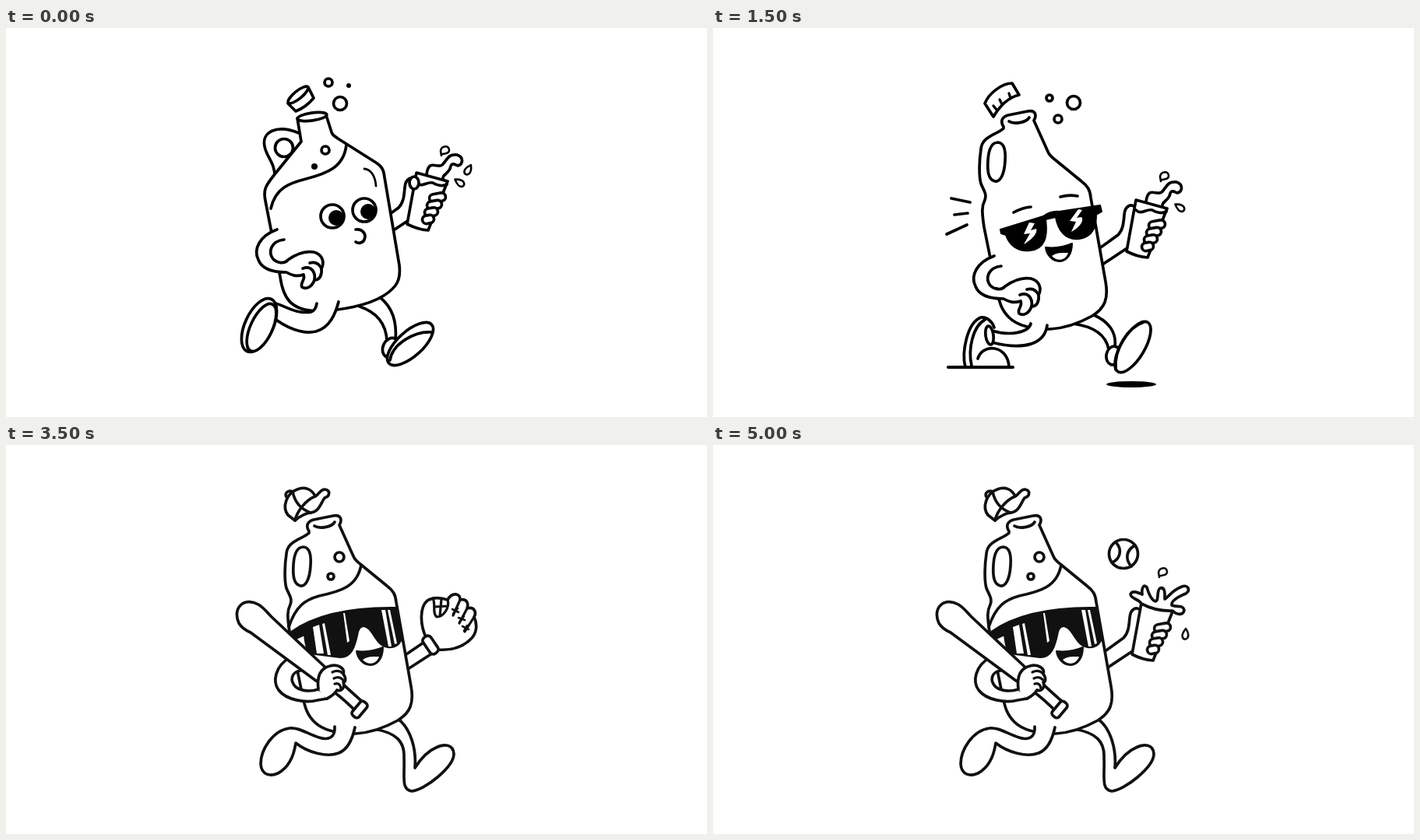
An HTML page that plays this animation: 900x500 px, repeating every 5500 ms.

```html
<!DOCTYPE html>
<html lang="en">
<head>
<meta charset="utf-8">
<title>Running bottle</title>
<style>
html, body { margin: 0; width: 100%; height: 100%; overflow: hidden; background: #fff; }
svg { display: block; width: 900px; height: 500px; }
#stage { fill: none; stroke: currentColor; stroke-width: 3.7; stroke-linecap: round; stroke-linejoin: round; }
</style>
</head>
<body>
<svg viewBox="0 0 900 500"><g id="stage"></g></svg>
<script>
const line = (d, w = 3.7) => `<path d="${d}" stroke-width="${w}"/>`;
const shape = d => `<path d="${d}" fill="#fff"/>`;
const ink = d => `<path d="${d}" fill="currentColor" stroke-width="2"/>`;
const glint = d => `<path d="${d}" fill="#fff" stroke="none"/>`;
const oval = (x, y, rx, ry = rx, turn = 0) =>
  `<ellipse cx="${x}" cy="${y}" rx="${rx}" ry="${ry}" fill="#fff" transform="rotate(${turn} ${x} ${y})"/>`;
const pill = (x, y, w, h, turn, r = h / 2) =>
  `<rect x="${x - w / 2}" y="${y - h / 2}" width="${w}" height="${h}" rx="${r}" fill="#fff" transform="rotate(${turn} ${x} ${y})"/>`;
const dot = (x, y, rx, ry = rx) => `<ellipse cx="${x}" cy="${y}" rx="${rx}" ry="${ry}" fill="currentColor" stroke="none"/>`;
const move = (x, y, ...parts) => `<g transform="translate(${x} ${y})">${parts.join('')}</g>`;
const spin = (a, x, y, part) => `<g transform="rotate(${a} ${x} ${y})">${part}</g>`;
const curl = (x, y) => move(x, y, line('M-4 6L-5 0C-4-7 6-8 6-1C6 4 1 3-2 4', 2.6));
const tear = (x, y, a = 0) => move(x, y, spin(a, 0, 0, line('M1-7C-3-2-5 3-2 6C2 8 5 4 4 0C4-3 2-5 1-7Z', 2.6)));
const bubbles = (...list) => list.map(([x, y, r]) => oval(x, y, r)).join('');

// Bottle
const rim = line('M374 102C380 106 396 104 400 97');
const grip = shape('M347 152C348 136 352 129 360 129C368 130 370 140 369 153C368 170 363 180 356 179C348 177 346 168 347 152Z');
const bottle = shape('M367 109C362 101 366 96 373 94L398 89C408 87 410 94 406 101L424 141C426 146 430 149 434 152L467 179C475 185 478 190 479 200L498 308C502 330 497 342 481 352C463 362 443 368 427 369C405 369 386 366 374 354C364 344 362 335 359 322L342 238C339 218 339 211 343 203C346 195 341 190 338 182C335 172 336 150 338 138C339 121 359 119 367 111') + rim + grip;
const liquid = line('M341 232C350 205 362 197 380 192C408 186 429 180 434 152') + oval(406, 142, 6) + oval(395, 167, 4);

// Faces
const goggles = ink('M344 238C372 218 414 206 478 207L487 244C484 256 476 259 468 258C459 257 455 250 449 241C442 230 434 227 430 238C426 259 421 271 407 271L375 267C365 266 363 260 361 242L346 249Z')
  + glint('M372 232L380 229L386 266L377 266ZM384 228L387 227L395 268L391 268ZM411 214L413 214L419 250L416 252ZM460 210L465 210L473 257L469 257ZM468 210L471 210L480 253L477 254Z');
const smile = ink('M428 263Q446 265 462 258C462 272 455 281 446 281C436 281 429 272 428 263Z')
  + glint('M436 274C442 269 451 270 457 270C453 281 442 281 436 274Z');
const shades = ink('M367 266L422 249Q432 242 442 243L495 235L497 243L490 247C490 264 484 276 468 278C450 280 441 267 438 250L425 253C428 275 424 291 405 293C388 295 378 285 374 273L368 271Z')
  + glint('M404 257L397 272L405 271L397 285C409 278 415 270 413 265L406 267L411 258ZM467 240L456 255L464 256L458 269C469 263 475 254 471 250L465 251L472 241Z')
  + line('M384 244Q395 238 406 237M444 224Q455 221 466 223');
const eye = (x, y) => oval(x, y, 15) + dot(x + 5, y + 2, 10);

// Limbs
const runLeft = shape('M400 360C401 374 392 378 380 374C364 369 355 361 342 362C320 365 305 390 305 408C306 423 318 424 327 420C342 412 348 395 350 381C365 393 390 400 405 394C418 389 423 375 426 361');
const runRight = shape('M451 363C480 368 490 380 489 400C490 425 485 441 499 443C515 442 553 412 553 395C552 382 540 382 530 387C518 392 510 402 503 413C505 390 498 362 481 350');
const fistArm = '<circle cx="358" cy="302" r="13" fill="#fff" stroke="none"/>'
  + shape('M355 275C333 283 324 300 331 314C336 327 353 330 367 330C374 334 380 336 389 333C392 339 384 344 387 349C393 353 400 348 403 340C410 340 413 333 412 325C416 318 414 307 402 304C390 302 380 306 369 314C364 320 355 318 350 313C343 304 347 290 364 288')
  + line('M397 318C404 316 409 319 412 325M388 325C398 321 405 329 403 340');

// Cup
const reach = shape('M489 264L514 246C520 240 521 232 522 220C523 208 531 205 537 211L530 262L524 264L494 284');
const glass = shape('M537 201L577 212L552 275Q538 274 525 267Z');
const fingers = [0, 1, 2, 3].map(i => pill(564 - 4 * i, 233 + 9.3 * i, 21 - 2 * i, 10.5, -10)).join('');
const wave = shape('M550 203C553 181 565 198 571 190C577 183 578 177 589 178C598 181 597 190 590 192C585 190 582 187 580 196C576 204 570 203 571 210');
const cup = reach + wave + glass + line('M537 214C544 221 550 212 558 214C565 218 570 219 576 216') + fingers;
const splash = tip => reach + glass
  + shape(`M537 202C534 196 524 196 523 190C525 184 533 188 538 190C537 182 540 176 544 181C546 188 549 197 555 199C560 198 556 185 561 182C568 180 567 190 567 196C573 193 574 186 ${tip - 9} 180C${tip - 2} 177 ${tip + 3} 184 ${tip - 4} 189C582 194 575 199 576 204C583 207 590 203 592 210C591 217 583 217 577 211Q556 212 537 202`)
  + fingers;
const ball = oval(529, 138, 18.5) + line('M519 123C528 132 525 145 514 149M544 127C532 133 531 145 539 154');
const sipCup = cup + curl(573, 172);
const tossCup = tip => splash(tip) + curl(564, 162) + tear(593, 241) + move(-15, 0, ball);

// Headgear
const screwCap = shape('M348 79C347 74 355 64 368 58C374 56 377 57 379 60L385 69C386 76 366 92 357 93C353 93 350 88 348 79Z')
  + line('M356 92C352 83 375 68 385 69M353 77L357 84M361 69L365 75M370 63L373 68', 3.3);
const bandCap = shape('M347 104C352 91 369 78 382 78L391 93C378 96 367 106 358 121Z')
  + line('M358 107L362 112M366 99L369 105M378 91L380 97', 3.3);
const ballCap = shape('M371 97L362 90C354 80 360 62 374 57C384 53 393 57 397 66C402 64 402 58 409 57C417 58 416 66 409 68C404 75 402 86 391 87C383 88 377 92 371 97Z')
  + line('M361 68C356 63 362 57 368 60C371 75 380 83 391 87M371 97C374 84 386 70 397 66');
const sportCap = move(-22, -2, ballCap);

// Sports gear
const bat = shape('M366 272C345 284 342 304 350 315C360 328 385 332 400 328L412 326L410 318L401 314C392 317 380 317 372 311C364 303 366 292 378 290')
  + shape('M299 229C290 209 306 195 324 205C331 209 335 215 341 221L407 283C425 300 440 315 460 332L450 343C425 318 415 313 398 303L314 241C307 238 302 234 299 229Z')
  + pill(454, 340, 11, 23, 40, 4)
  + shape('M401 314C399 298 403 287 416 284C427 281 436 288 433 294C437 300 436 305 433 305C436 312 430 317 425 315C422 320 418 323 412 326')
  + line('M419 292Q427 288 433 294M421 300Q429 296 434 304M422 307Q429 305 430 313', 3.2);
const glove = line('M511 271L536 254M516 288L550 266')
  + shape('M540 249C531 231 531 208 541 200C549 195 558 196 567 199C573 188 584 191 583 199C592 197 594 204 592 210C602 207 604 216 601 221C606 232 604 244 595 251C583 262 568 264 555 263Z')
  + pill(545, 257, 12, 25, -34, 5)
  + line('M567 199C570 210 561 221 553 221C547 217 552 204 548 197M550 208L567 207M559 198L557 220M583 199L574 219M592 210L582 229M601 221L589 240', 3.2)
  + line('M573 211L581 215M574 217L580 210M581 222L589 225M582 228L588 220M586 233L594 237M588 239L592 232', 2.6);
const mitt = move(-22, -2, glove);

// Outfits
const runner = (x, y, hat, hand, arm = fistArm) =>
  move(x, y, hand, runRight, bottle, liquid, goggles, smile, runLeft, arm, hat);
const batter = (x, y, hat, hand) => runner(x, y, hat, hand, move(-22, -2, bat));

const jug =
  move(-10, -15, cup) + oval(524, 199, 6, 8) + curl(563, 158) + tear(593, 182, 25) + tear(582, 199, -60)
  + shape('M454 358C478 366 488 382 489 402L500 402C502 380 497 360 481 347')
  + oval(494, 411, 10, 13, 25)
  + oval(519, 406, 16, 37, 48) + line('M493 427C496 406 525 389 547 391')
  + shape('M376 135C347 123 328 134 332 152C334 165 345 173 345 190') + oval(357, 154, 11.5)
  + shape('M374 116L379 146L345 188C333 203 330 208 333 222L352 320C356 348 366 363 400 364C430 363 464 357 485 344C502 333 507 324 505 305L486 192C485 183 483 178 475 173L426 142C422 139 419 138 418 134L411 112')
  + oval(393, 114, 19, 5, -8)
  + line('M340 232C346 205 365 199 385 194C412 187 434 179 437 150')
  + oval(410, 157, 5) + dot(396, 178, 4)
  + line('M460 181C469 182 474 191 475 203', 2.8)
  + eye(419, 242) + eye(460, 234)
  + line('M449 259C458 258 463 265 460 272C458 277 452 277 449 275')
  + shape('M399 354C397 367 389 366 378 365C364 363 356 356 340 352V370C360 386 381 394 398 390C416 385 423 367 427 352')
  + oval(325, 382, 18, 37, 25) + oval(328, 385, 14, 33, 25)
  + move(-7, -16, fistArm)
  + shape('M362 97L372 107Q385 102 395 90L388 76Z') + oval(375, 86, 16, 5, -39)
  + bubbles([414, 70, 5], [429, 97, 8.5]) + dot(440, 74, 3);

const coolRunner = move(4, -1, sipCup, runRight, bottle, liquid, move(-4, -25, shades), move(-5, 1, smile),
  runLeft, fistArm, move(-2, -17, bandCap), bubbles([426, 72, 4], [457, 78, 8.5], [437, 99, 5]));

const stepFront =
  shape('M460 387C490 391 503 404 506 420L514 416C516 400 508 385 487 376')
  + oval(512, 428, 9, 12, 10) + oval(537, 417, 15, 37, 31) + line('M515 446C513 418 531 392 551 385');
const stepBack =
  shape('M406 387C403 399 378 403 356 396V411C398 422 424 413 427 389')
  + shape('M322 443C317 424 324 386 342 379C350 378 357 385 359 392')
  + line('M330 441C325 419 332 390 347 382')
  + shape('M338 432C344 412 376 414 378 442')
  + oval(353, 402, 5, 12, -8)
  + line('M300 443H383', 4);
const strut =
  move(4, 27, cup) + curl(577, 198) + tear(597, 238, -60) + stepFront
  + move(4, 25, bottle) + shades + move(-3, 26, smile)
  + stepBack + move(4, 25, fistArm) + bandCap
  + line('M304 226L328 231M308 247L325 245M298 272L324 260')
  + bubbles([430, 97, 4], [461, 103, 8.5], [441, 124, 5]);

const whistle =
  move(18, 27, cup) + curl(591, 199) + tear(610, 240, -60)
  + line('M408 422C406 405 408 395 413 388M421 412C426 401 450 402 452 422M470 378C473 395 468 402 460 404M456 382C457 392 452 396 444 393M424 399L438 405')
  + line('M398 423H461', 4)
  + shape('M371 135C368 126 371 121 378 118L403 112C412 110 414 118 410 126L429 160C437 170 470 190 480 200C488 208 488 216 491 228L516 320C519 337 516 350 507 361C491 374 450 386 415 385C382 382 384 353 374 332L353 245C350 230 358 222 350 210C344 194 345 170 347 155C350 146 360 144 371 135')
  + move(7, 26, grip)
  + shape('M376 129C383 138 389 135 393 138C393 147 399 143 402 150C407 160 414 152 412 148C408 140 406 135 410 127C409 120 397 127 385 130')
  + line('M378 129Q397 130 407 120')
  + line('M410 237C385 249 367 264 374 278M463 227Q468 219 474 218')
  + ink('M404 229C408 222 440 216 460 216C466 216 467 222 465 236C463 256 452 264 438 264C420 264 408 248 404 229Z')
  + ink('M472 213L506 212C510 213 509 222 508 232C505 245 495 246 488 242C478 236 474 224 472 213Z')
  + glint('M436 226L424 244L432 245L428 257L441 240L433 239ZM495 218L488 230L493 230L491 238L499 226L494 226Z')
  + line('M467 262C480 260 488 270 488 280C488 292 481 299 473 301')
  + shape('M491 266C490 254 499 250 503 259C510 270 507 281 498 279C493 278 491 273 491 266Z') + line('M498 261Q495 267 501 270', 2.6)
  + line('M513 259L517 252M515 266L523 263M514 271L521 271', 3.2)
  + shape('M423 388L505 437L488 417L441 390Z') + line('M424 388H446', 4)
  + shape('M506 350C496 352 491 368 488 385V417L507 438') + oval(508, 394, 10.5, 43)
  + dot(502, 454, 32, 4)
  + glint('M340 286L385 313L384 329L360 324L334 299Z')
  + line('M341 290C355 303 370 310 385 313M335 299C346 315 365 325 384 329')
  + shape('M312 268L301 256C298 249 304 246 308 250L320 261L313 242C312 235 319 234 322 240L331 262C340 264 344 276 342 290L335 297C325 300 315 301 307 295C304 292 305 288 308 286C299 286 298 277 303 273C306 271 309 271 312 272Z')
  + line('M312 272Q322 272 328 278M320 272C331 266 335 274 326 282M308 286Q321 281 325 289', 3.2)
  + move(-5, 7, spin(-24, 369, 99, bandCap))
  + bubbles([392, 66, 4], [412, 80, 8.5], [395, 99, 5]);

const poses = [
  jug,
  coolRunner,
  strut,
  move(2, -7, strut) + dot(537, 458, 32, 4),
  whistle,
  runner(0, 0, screwCap, sipCup),
  runner(-2, 2, sportCap, sipCup),
  batter(22, 2, sportCap, mitt),
  batter(22, 0, screwCap, mitt),
  batter(15, 0, screwCap, tossCup(592)),
  batter(13, 2, sportCap, tossCup(598))
];

const stage = document.getElementById('stage');
let shown = -1;
function draw() {
  const i = Math.floor(performance.now() % 5500 / 500);
  if (i !== shown) {
    shown = i;
    stage.style.color = i < 5 ? '#000' : '#111';
    stage.innerHTML = poses[i];
  }
  requestAnimationFrame(draw);
}
draw();
</script>
</body>
</html>
```
